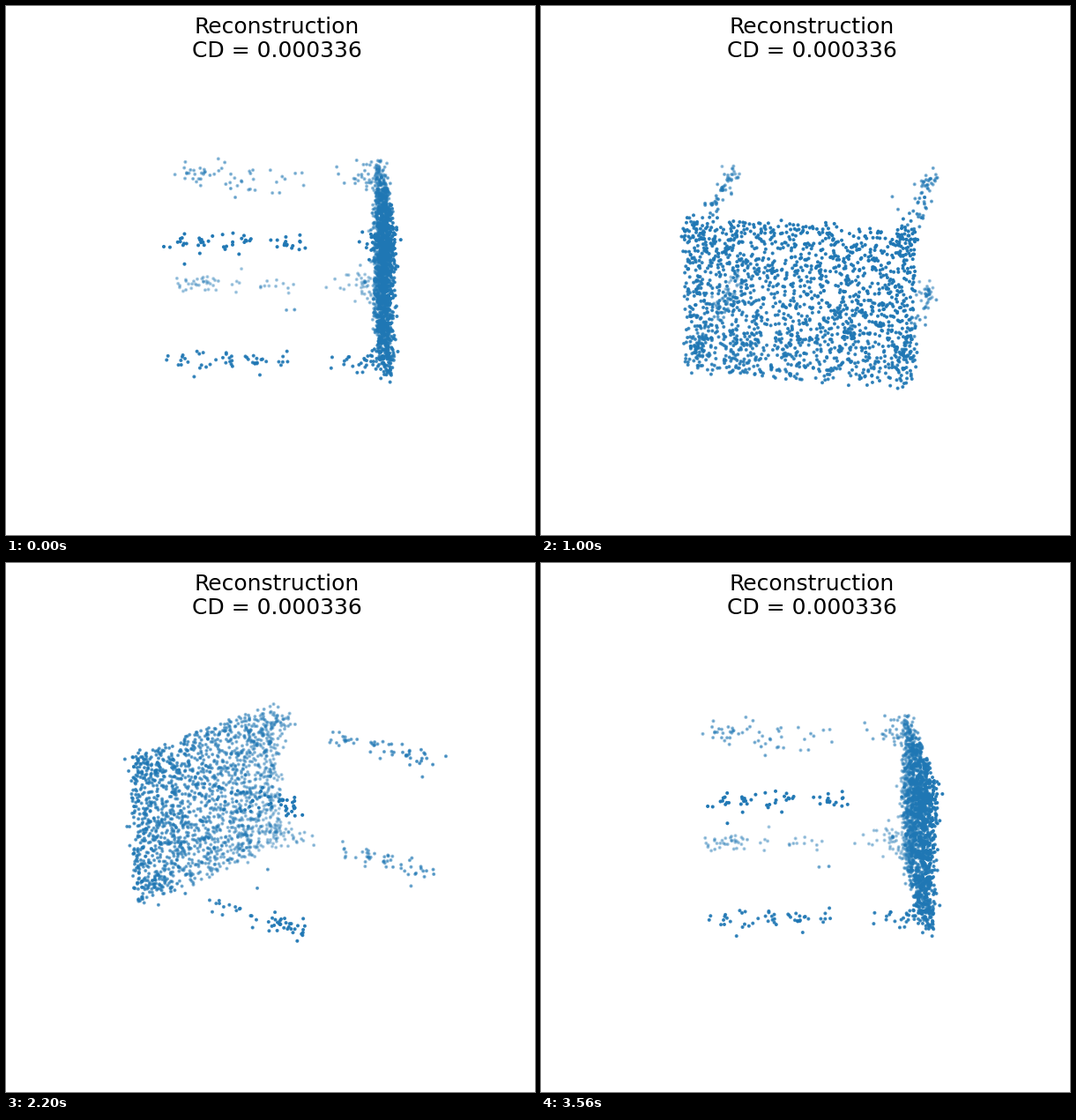
These frames come from a looping animation (600x600 px, 3.6 s). A matplotlib script:

```python
import numpy as np
import matplotlib.pyplot as plt
from matplotlib.animation import FuncAnimation
from matplotlib.colors import to_rgb

SIZE, DPI = 600, 100
FRAMES, INTERVAL = 90, 40
ELEV = np.radians(20)
CAMERA_DIST = 10
FOCAL = 2497                # pixels per unit at unit distance
CENTER = (313.7, 296.8)
BLUE = to_rgb("tab:blue")

rng = np.random.default_rng(12)


def make_top(count):
    """Table top: a thin upright slab with slightly rough edges."""
    x = rng.uniform(-0.508, 0.512, count) + rng.normal(0, 0.007, count)
    y = 0.456 + rng.uniform(-0.022, 0.022, count) + rng.normal(0, 0.013, count)
    z = rng.uniform(-0.355, 0.360, count) + rng.normal(0, 0.012, count)
    return np.column_stack([x, y, z])


def make_leg(x, z, count, clump, spread=0.021, sag=0.0):
    """Leg along y: clump is the share at the foot, sag bends it down midway."""
    y = rng.uniform(-0.51, 0.10, count)
    part = rng.random(count)
    foot = part < clump
    root = part > 0.84
    y[foot] = rng.uniform(-0.51, -0.33, foot.sum())
    y[root] = rng.uniform(0.20, 0.40, root.sum())
    wide = spread * np.where(rng.random(count) < 0.1, 1.9, 1.0)
    dip = sag * np.cos(np.pi * np.clip(y / 0.9, -0.5, 0.5))
    return np.column_stack([
        x + rng.normal(0, 0.8, count) * wide,
        y,
        z - dip + rng.normal(0, 1, count) * wide,
    ])


def make_joint(x, z, count):
    """Loose cluster where a leg meets the top."""
    return rng.normal((x, 0.415, z), (0.030, 0.035, 0.042), (count, 3))


STRAYS = np.array([
    (-0.157, 0.018, -0.267),
    (-0.040, 0.055, -0.220),
    (-0.335, -0.220, 0.226),
    (-0.305, -0.240, 0.279),
])

cloud = np.vstack([
    make_top(1690),
    make_leg(0.475, 0.289, 56, 0.05),
    make_leg(0.475, -0.260, 62, 0.05),
    make_leg(-0.448, 0.318, 54, 0.15, spread=0.029, sag=0.035),
    make_leg(-0.455, -0.249, 58, 0.35),
    make_joint(0.465, 0.289, 30),
    make_joint(0.465, -0.260, 34),
    make_joint(-0.450, 0.310, 30),
    make_joint(-0.450, -0.255, 34),
    STRAYS,
])


def project(azim):
    """Screen positions and nearness of the cloud seen from an azimuth."""
    x, y, z = cloud.T
    right = -x * np.sin(azim) + y * np.cos(azim)
    front = x * np.cos(azim) + y * np.sin(azim)
    up = z * np.cos(ELEV) - front * np.sin(ELEV)
    near = front * np.cos(ELEV) + z * np.sin(ELEV)
    scale = FOCAL / (CAMERA_DIST - near)
    pos = np.column_stack([CENTER[0] + scale * right, CENTER[1] - scale * up])
    return pos, near


fig = plt.figure(figsize=(SIZE / DPI, SIZE / DPI), dpi=DPI, facecolor="white")
ax = fig.add_axes([0, 0, 1, 1])
ax.set_xlim(0, SIZE)
ax.set_ylim(SIZE, 0)
ax.axis("off")
ax.text(307.5, 58.5, "Reconstruction\nCD = 0.000336", fontsize=18,
        family="DejaVu Sans", ha="center", va="baseline")
dots = ax.scatter(cloud[:, 0], cloud[:, 1], s=2, linewidths=1.5)


def update(frame):
    pos, near = project(2 * np.pi * frame / FRAMES)
    order = np.argsort(near)
    pos, near = pos[order], near[order]
    alpha = 0.3 + 0.7 * (near - near[0]) / (near[-1] - near[0])
    dots.set_offsets(pos)
    dots.set_facecolor([(*BLUE, a) for a in alpha])
    return dots,


anim = FuncAnimation(fig, update, frames=FRAMES, interval=INTERVAL,
                     repeat=True, repeat_delay=0)
plt.show()
```
